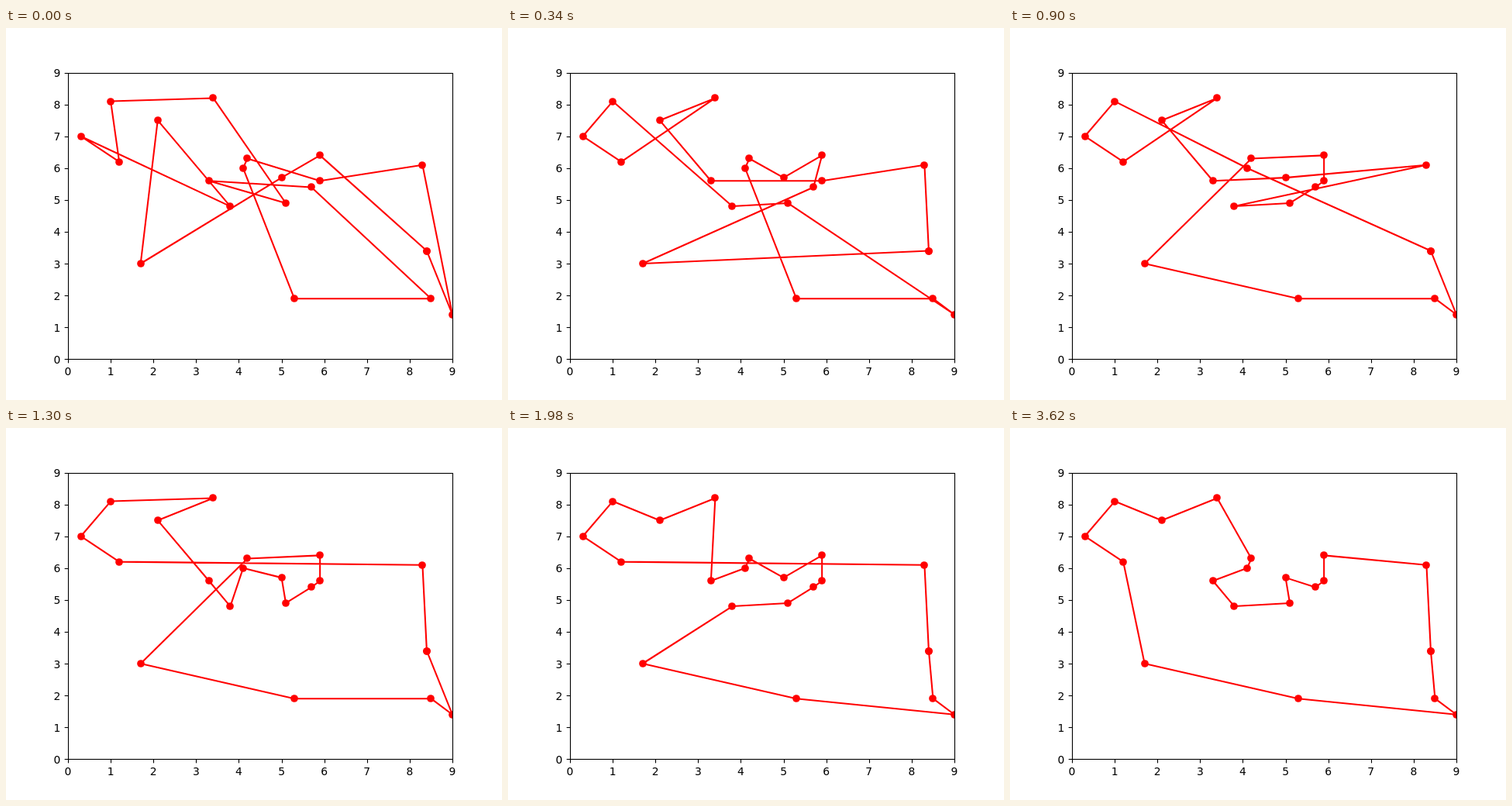
These frames come from a looping animation (640x480 px, 4.72 s). An HTML page with a canvas:

```html
<!DOCTYPE html>
<html lang="en">
<head>
<meta charset="utf-8">
<title>Shortest round trip</title>
<style>
  html, body { margin: 0; width: 100%; height: 100%; overflow: hidden; background: #fff; }
  canvas { display: block; }
</style>
</head>
<body>
<canvas id="plot" width="640" height="480"></canvas>
<script>
const ctx = document.getElementById('plot').getContext('2d');
const LOOP = 4720;
const PT = 100 / 72; // pixels per typographic point
const LEFT = 80, RIGHT = 576, TOP = 57.6, BOTTOM = 427.2, MAX = 9;

const cities = {
  A: [0.3, 7.0], B: [1.0, 8.1], C: [1.2, 6.2], D: [1.7, 3.0], E: [2.1, 7.5],
  F: [3.3, 5.6], G: [3.4, 8.2], H: [3.8, 4.8], I: [4.1, 6.0], J: [4.2, 6.3],
  K: [5.0, 5.7], L: [5.1, 4.9], M: [5.3, 1.9], N: [5.7, 5.4], O: [5.9, 5.6],
  P: [5.9, 6.4], Q: [8.3, 6.1], R: [8.4, 3.4], S: [8.5, 1.9], T: [9.0, 1.4]
};
const HOME = 'R';

// Start time in ms and visiting order of each improved tour
const tours = [
  [0, 'CAHEDKPRTQOJIMSNFLGB'],
  [120, 'ABCGLFNSMIJOQTRPKDEH'],
  [160, 'ACGEFLNSMIJOQTRPKDHB'],
  [200, 'ACGEFLNSMIJKPOQTRDHB'],
  [240, 'ACGEFLSMIJKPNOQTRDHB'],
  [280, 'ACGEFOQRTSMIJKPNDLHB'],
  [340, 'ABHLTSMIJKPNDRQOFEGC'],
  [380, 'ABHLTSMDIJKPNRQOFEGC'],
  [440, 'ABHLTSMDJIKPNRQOFEGC'],
  [500, 'ABHLTSMDIJPKNRQOFEGC'],
  [540, 'ABHLTSMDIJPKNORQFEGC'],
  [600, 'ABHLTSMDIJPKONRQFEGC'],
  [700, 'ABIRSTMDJPKONLHQFEGC'],
  [900, 'ABIRTSMDJPONLHQKFEGC'],
  [960, 'ABRTSMDIJPONLHQKFEGC'],
  [1000, 'ABQRTSMDIJPONLHKFEGC'],
  [1060, 'ABQRTSMDIJPONLKHFEGC'],
  [1300, 'ABGEFHIKLNOPJDMSTRQC'],
  [1440, 'BAEGFHIKLNOPJDMSTRQC'],
  [1500, 'BAEGFHIKLNOPJDMTSRQC'],
  [1600, 'BAEGFIJPOKNLHDMTSRQC'],
  [1680, 'ABEGFIJPOKNLHDMTSRQC'],
  [1760, 'ABEGFIJPKONLHDMTSRQC'],
  [1840, 'ABEGFIJPKNOLHDMTSRQC'],
  [1940, 'ABEGFIJKPNOLHDMTSRQC'],
  [1980, 'ABEGFIJKPONLHDMTSRQC'],
  [3440, 'ABEGFIJKPONLHQRTSMDC'],
  [3460, 'BAEGFIJKPONLHQRTSMDC'],
  [3480, 'ABEGFIJKPONLHQRSTMDC'],
  [3500, 'ABEGFIJPONKLHQRSTMDC'],
  [3520, 'ABEGFIJHLKNOPQRSTMDC'],
  [3560, 'ABEGFJIHLKNOPQRSTMDC'],
  [3600, 'ABEGJIFHKLNOPQRSTMDC'],
  [3620, 'ABEGJIFHLKNOPQRSTMDC']
];

const toX = x => LEFT + x * (RIGHT - LEFT) / MAX;
const toY = y => BOTTOM - y * (BOTTOM - TOP) / MAX;
const snap = v => Math.round(v) + 0.5;

function segment(x1, y1, x2, y2) {
  ctx.beginPath();
  ctx.moveTo(x1, y1);
  ctx.lineTo(x2, y2);
  ctx.stroke();
}

function drawDot(name) {
  const [x, y] = cities[name];
  ctx.beginPath();
  ctx.arc(Math.round(toX(x)), Math.round(toY(y)), 3.5 * PT, 0, 2 * Math.PI);
  ctx.fill();
}

function drawTour(order) {
  ctx.save();
  ctx.beginPath();
  ctx.rect(LEFT, Math.round(TOP), RIGHT - LEFT, Math.round(BOTTOM) - Math.round(TOP));
  ctx.clip();
  ctx.strokeStyle = ctx.fillStyle = '#f00';
  ctx.lineWidth = 1.5 * PT;
  ctx.lineJoin = 'round';
  ctx.beginPath();
  for (const name of order) {
    const [x, y] = cities[name];
    ctx.lineTo(toX(x), toY(y));
  }
  ctx.closePath();
  ctx.stroke();
  // The home city is both first and last stop
  for (const name of order + HOME) drawDot(name);
  ctx.restore();
}

function drawAxes() {
  const tick = 3.5 * PT;
  const left = snap(LEFT), bottom = snap(BOTTOM);
  ctx.strokeStyle = ctx.fillStyle = '#000';
  ctx.lineWidth = 0.8 * PT;
  ctx.lineJoin = 'miter';
  ctx.strokeRect(left, snap(TOP), snap(RIGHT) - left, bottom - snap(TOP));
  ctx.font = `${10 * PT}px "DejaVu Sans", sans-serif`;
  for (let i = 0; i <= MAX; i++) {
    const x = toX(i), y = toY(i);
    segment(snap(x), bottom, snap(x), bottom + tick);
    segment(left - tick, snap(y), left, snap(y));
    ctx.textAlign = 'center';
    ctx.fillText(i, x, 448);
    ctx.textAlign = 'right';
    ctx.fillText(i, LEFT - 2 * tick, Math.round(y + 5.5));
  }
}

function draw(time) {
  const order = tours.findLast(([start]) => start <= time)[1];
  ctx.fillStyle = '#fff';
  ctx.fillRect(0, 0, 640, 480);
  drawTour(order);
  drawAxes();
}

const begin = performance.now();
function tick() {
  draw((performance.now() - begin) % LOOP);
  requestAnimationFrame(tick);
}
tick();
</script>
</body>
</html>
```
